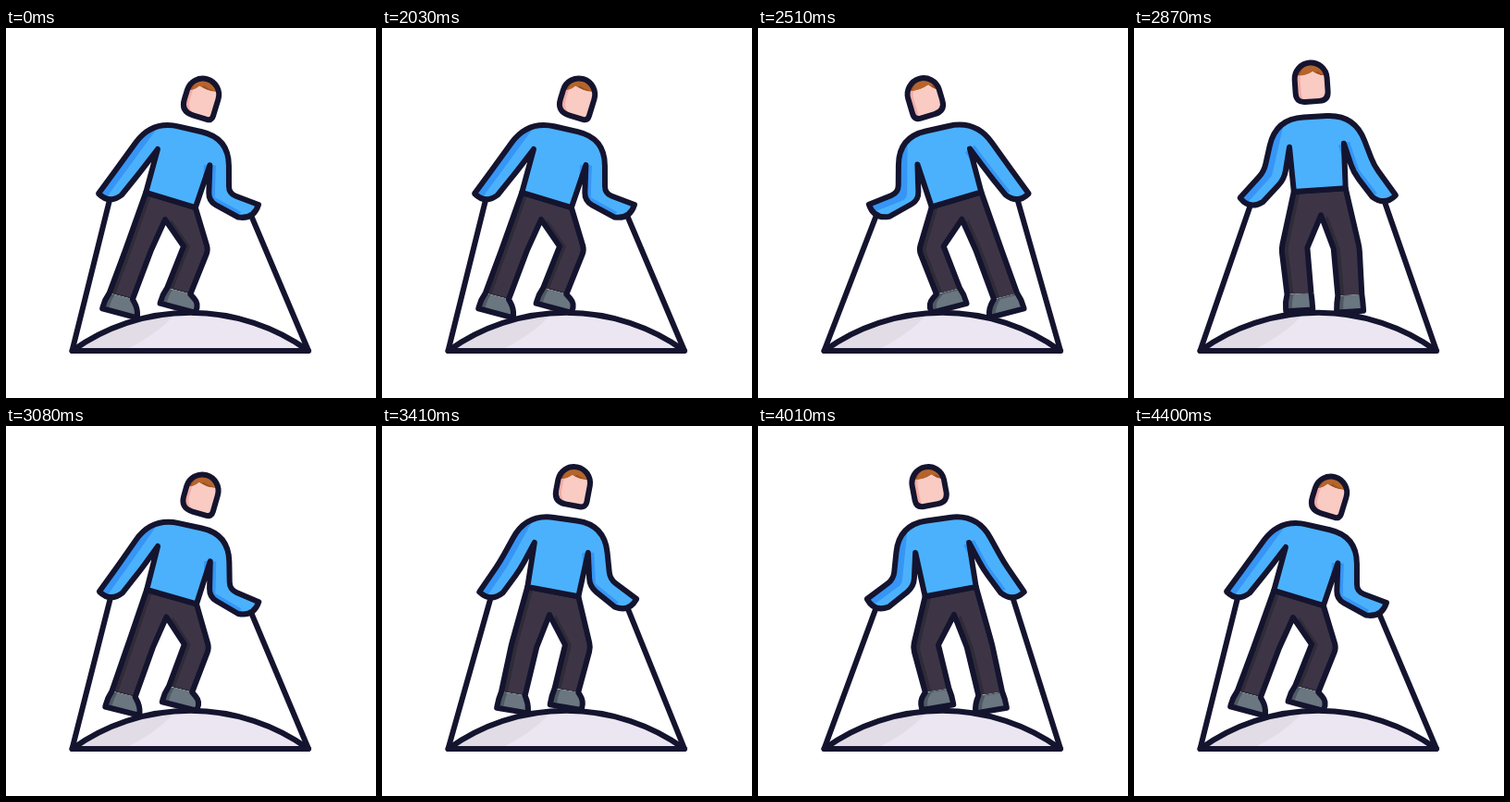
Write an HTML page that moves like this. It is 400 px wide and 400 px high and loops after 4.46 s.

```html
<!DOCTYPE html>
<html lang="en">
<head>
<meta charset="utf-8">
<title>Balance</title>
<style>
  html, body { margin: 0; width: 100%; height: 100%; overflow: hidden; background: #fff; }
  svg { display: block; width: 100vw; height: 100vh; }
  .line { fill: none; stroke: #14142f; stroke-width: 6; stroke-linejoin: round; stroke-linecap: round; }
  .shade { fill: none; stroke: #3695f5; stroke-linejoin: round; }
</style>
</head>
<body>
<svg id="stage" viewBox="0 0 400 400">
  <path d="M72 349A218.7 218.7 0 0 1 327 349Z" fill="#ebe6f1"/>
  <path d="M72 349A218.7 218.7 0 0 1 184 308.5Q160 334 127 349Z" fill="#e1dce5"/>
  <path class="line" d="M71.5 349A218.7 218.7 0 0 1 327 349Z"/>
</svg>
<script>
const LOOP = 4460, START = 1996, SWING = 600, SWINGS = 4;
const MID = 196.5;    // x of the body's mirror axis
const TILT = 17;      // degrees at full lean
const NS = 'http://www.w3.org/2000/svg';
const stage = document.getElementById('stage');

function add(tag, attrs, parent = stage) {
  const el = document.createElementNS(NS, tag);
  for (const k in attrs) el.setAttribute(k, attrs[k]);
  return parent.appendChild(el);
}
const setD = (el, d) => el.setAttribute('d', d);
const line = () => add('path', { class: 'line' });

let clips = 0;
function clipped() {
  const id = 'clip' + clips++;
  const mask = add('path', {}, add('clipPath', { id }));
  return { mask, group: add('g', { 'clip-path': `url(#${id})` }) };
}

// Flat shape whose left-facing edges show a darker strip.
function shaded(dark, light, shift) {
  const { mask, group } = clipped();
  const base = add('path', { fill: dark }, group);
  const top = add('path', { fill: light, transform: `translate(${shift} 0)` }, group);
  return d => [mask, base, top].forEach(el => setD(el, d));
}

const ropes = line();
const pants = shaded('#2f2b38', '#3d3546', 7);
const shoes = [0, 1].map(() => shaded('#4f5963', '#6a7680', 7));
const pantsLine = line();
const shirt = clipped();
const shirtFill = add('path', { fill: '#4bb1fd' }, shirt.group);
const outerShade = add('path', { class: 'shade', 'stroke-width': 19 }, shirt.group);
const innerShade = add('path', { class: 'shade', 'stroke-width': 13 }, shirt.group);
const shirtLine = line();
const face = shaded('#f2aca6', '#f9cbc3', 6);
const hair = shaded('#9c5022', '#b4652c', 5);
const faceLine = line();

const fmt = p => p[0].toFixed(2) + ' ' + p[1].toFixed(2);
const poly = pts => 'M' + pts.map(fmt).join('L');
const round = (p, r) => [p[0], p[1], r];
const mirror = ([x, y, ...r]) => [2 * MID - x, y, ...r];

// Maps points of a frame turned by deg around an origin to the stage.
function frame([ox, oy], deg) {
  const s = Math.sin(deg * Math.PI / 180), c = Math.cos(deg * Math.PI / 180);
  return (x, y) => [ox + x * c - y * s, oy + x * s + y * c];
}

function toward(p, q, r) {
  const len = Math.hypot(q[0] - p[0], q[1] - p[1]) || 1;
  const k = Math.min(1, r / len);
  return [p[0] + (q[0] - p[0]) * k, p[1] + (q[1] - p[1]) * k];
}

// Closed path; a third value on a point rounds that corner.
function outline(pts) {
  const n = pts.length;
  return pts.map((p, i) => {
    const cmd = i ? 'L' : 'M';
    if (!p[2]) return cmd + fmt(p);
    const from = toward(p, pts[(i + n - 1) % n], p[2]);
    const to = toward(p, pts[(i + 1) % n], p[2]);
    return cmd + fmt(from) + 'Q' + fmt(p) + ' ' + fmt(to);
  }).join('') + 'Z';
}

// Left half of the body; a > 0 leans away from this side.
function half(a) {
  const aa = a * a;
  const body = frame([MID - 18.5 * a, 174.5 + 11.5 * aa], TILT * a);
  const elbow = [148 - 15 * a, 155 - 15 * a + 13 * aa];
  const tip = [112.5 - 10 * a - 2.5 * aa, 182 - 6 * a + 3 * aa];
  const wrist = [137.5 - 8.5 * a - 4 * aa, 185 - 12 * a + 7.5 * aa];
  const hand = frame([(tip[0] + wrist[0]) / 2, (tip[1] + wrist[1]) / 2],
    Math.atan2(wrist[1] - tip[1], wrist[0] - tip[0]) * 180 / Math.PI);

  const knee = [168.5 - 22 * a - 2 * aa, 238];
  const foot = frame([169.3 - 41 * a - 4 * aa, 288 + 2.8 * a - .8 * aa], 15 * a);
  const reach = k => 13 + (k > 0 ? 10 : -3) * k;
  const heel = -reach(-a), toe = reach(a);
  const instep = k => round(foot(k, 8), 8);

  return {
    waist: body(-28, 0),
    pit: body(-29.5, -48.5),
    shoulder: round(body(-42.5 - 2 * a, -79.5 + 3 * a), 30),
    elbowOut: round([elbow[0] - 11, elbow[1] - 4], 8),
    elbowIn: round([elbow[0] + 11, elbow[1] + 4], 9),
    tip, wrist,
    palm: round(hand(0, 11), 40),
    grip: hand(0, 5.5),
    kneeOut: round([knee[0] - 14, knee[1] - 2 * a], 5),
    kneeIn: [knee[0] + 14 - 1.5 * aa, knee[1] + 2 * a],
    hemOut: foot(-13, 0),
    hemIn: foot(13, 0),
    toeOut: instep(heel - 2 * Math.min(0, a) * -1),
    toeIn: instep(toe - 2 * Math.max(0, a)),
    footOut: foot(heel, 18),
    footIn: foot(toe, 18)
  };
}

const flip = s => Object.fromEntries(Object.entries(s).map(([k, p]) => [k, mirror(p)]));
const pick = names => s => names.split(' ').map(n => s[n]);
const armOf = pick('shoulder elbowOut tip palm wrist elbowIn pit waist');
const legOf = pick('waist kneeOut hemOut hemIn kneeIn');
const bootLegOf = pick('waist kneeOut hemOut toeOut footOut footIn toeIn hemIn kneeIn');
const shoeOf = pick('hemOut toeOut footOut footIn toeIn hemIn');

function drawHead(a) {
  const map = frame([MID - .8 + 20 * a - 3 * a ** 3, 54 + 18 * a * a], TILT * a);
  const at = (x, y) => fmt(map(x, y));
  const R = 17.5, H = 24.5, left = 10.5 + 3.5 * a, right = 9 - 3.5 * a;
  const dome = `A${R} ${R} 0 0 1 `;
  const d = `M${at(-R, 0)}${dome}${at(R, 0)}L${at(R, H - right)}Q${at(R, H)} ${at(R - right, H)}` +
    `L${at(left - R, H)}Q${at(-R, H)} ${at(-R, H - left)}Z`;
  face(d);
  setD(faceLine, d);

  // Fringe: two locks that meet at a parting.
  const edge = y => Math.sqrt(R * R - y * y);
  const yl = -4 + 4 * a, yr = -4 - 4 * a, part = 1 - 7 * a;
  const xl = -edge(yl), xr = edge(yr);
  hair(`M${at(xl, yl)}${dome}${at(xr, yr)}Q${at((xr + part) / 2, -2 - 2 * a)} ${at(part, -8)}` +
    `Q${at((xl + part) / 2, -2 + 2 * a)} ${at(xl, yl)}Z`);
}

function draw(a) {
  const L = half(a), R = flip(half(-a));
  const crotch = [MID - 24.5 * a, 202 + 5 * a * a];

  setD(ropes, `M71.5 349L${fmt(L.grip)}M327 349L${fmt(R.grip)}`);

  pants(outline([...legOf(L), crotch, ...legOf(R).reverse()]));
  [L, R].forEach((s, i) => shoes[i](outline(shoeOf(s))));
  setD(pantsLine, outline([...bootLegOf(L), crotch, ...bootLegOf(R).reverse()]));

  const d = outline([...armOf(L), ...armOf(R).reverse()]);
  [shirt.mask, shirtFill, shirtLine].forEach(el => setD(el, d));
  setD(outerShade, poly([L.shoulder, L.elbowOut, L.tip]));
  setD(innerShade, poly([R.pit, R.elbowIn, R.wrist]));
  drawHead(a);
}

function leanAt(ms) {
  const u = Math.min(SWINGS, Math.max(0, (ms - START) / SWING));
  const n = Math.floor(u), x = u - n;
  const p = x < .5 ? 4 * x ** 3 : 1 - 4 * (1 - x) ** 3;
  return (n % 2 ? -1 : 1) * (1 - 2 * p);
}

function tick() {
  draw(leanAt(performance.now() % LOOP));
  requestAnimationFrame(tick);
}
tick();
</script>
</body>
</html>
```
